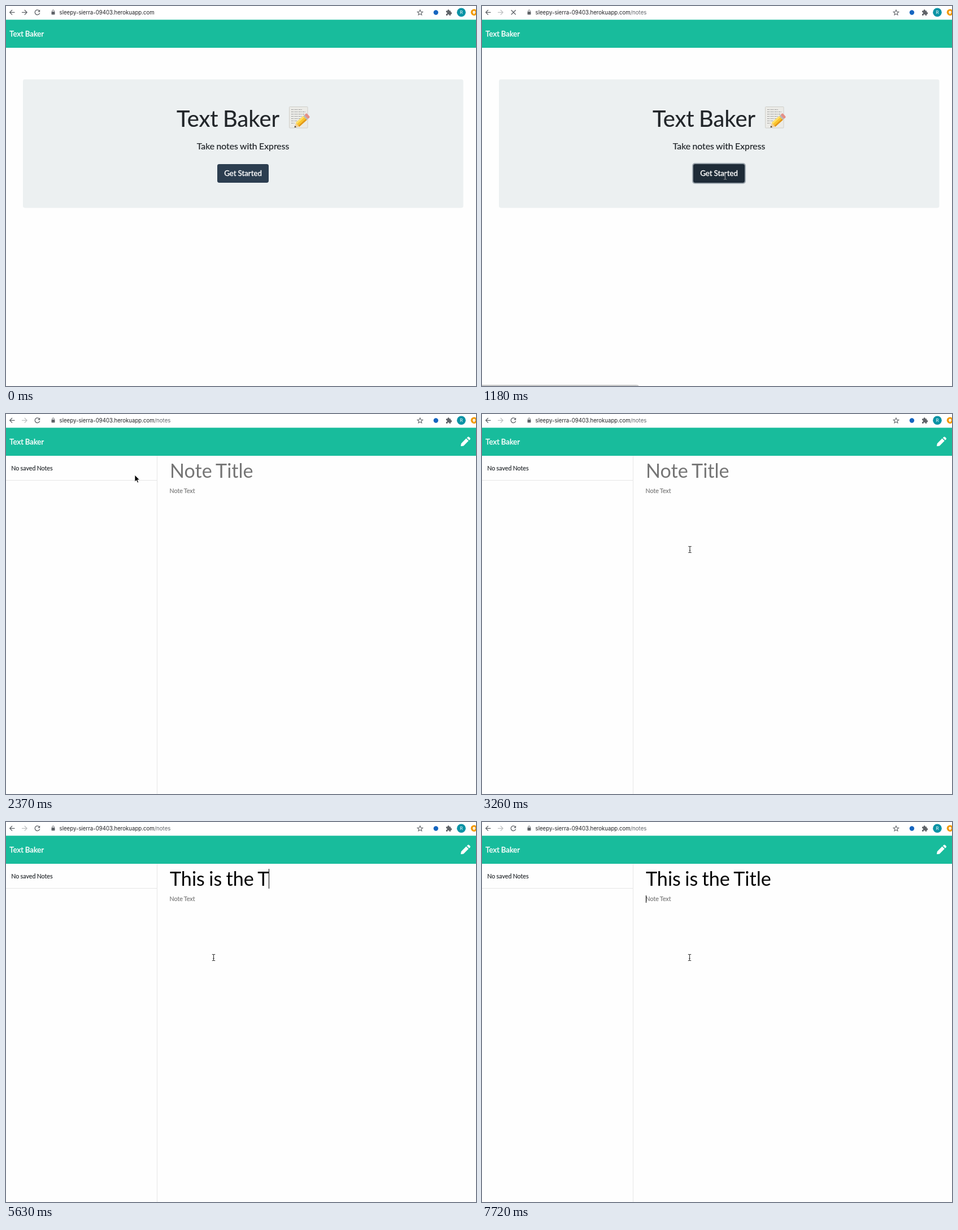
Write an HTML page that moves like this. It is 832 px wide and 673 px high and loops after 8000 ms.

```html
<!DOCTYPE html>
<html lang="en">
<head>
<meta charset="utf-8">
<title>Text Baker</title>
<style>
html, body { margin: 0; width: 100%; height: 100%; overflow: hidden; background: #fefefe; }
svg { display: block; width: 832px; height: 673px; font-family: Lato, sans-serif; }
text { white-space: pre; word-spacing: -.04em; }
.line { fill: none; stroke: #5f6368; stroke-width: 1.3; }
.small { font-size: 10.67px; stroke-width: .15; }
.lead { font-size: 13.33px; fill: #fff; stroke: #fff; stroke-width: .35; }
.ui { font-family: Inter, sans-serif; }
.dark { fill: #212529; stroke: #212529; }
</style>
</head>
<body>
<svg viewBox="0 0 832 673">
  <rect width="832" height="673" fill="#fefefe"/>

  <!-- browser bar -->
  <rect width="832" height="24.3" fill="#fff"/>
  <path class="line" d="M15.5 11.3H6.8M11 7L6.7 11.3 11 15.6"/>
  <path class="line" id="forward" d="M28 11.3H37M32.8 7L37.1 11.3 32.8 15.6"/>
  <g id="reload">
    <path class="line" d="M58.7 8.3A4.3 4.3 0 1 0 59.7 12.4"/>
    <path d="M60.2 6.5V10.6H56.1Z" fill="#5f6368"/>
  </g>
  <path class="line" id="stop" d="M51.7 7.3L59.7 15.3M59.7 7.3L51.7 15.3"/>
  <rect x="80.5" y="10" width="6" height="5.2" rx=".7" fill="#5f6368"/>
  <path class="line" style="stroke-width:1" d="M81.8 10V8.7a1.7 1.7 0 0 1 3.4 0V10"/>
  <text class="ui" x="94.6" y="14.8" font-size="9.65" fill="#202124">sleepy-sierra-09403.herokuapp.com<tspan id="path" fill="#5f6368">/notes</tspan></text>
  <path class="line" style="stroke-width:1.1" d="M733 6.9L734.3 10.1 737.7 10.4 735.1 12.6 735.9 15.9 733 14.1 730.1 15.9 730.9 12.6 728.3 10.4 731.7 10.1Z"/>
  <circle cx="761" cy="11.5" r="4.2" fill="#1565c0"/>
  <path d="M779 8.5h2.6a1.7 1.7 0 1 1 3.2 0h2.5v2.7a1.6 1.6 0 1 1 0 3.1v2.4h-2.7a1.5 1.5 0 1 0-2.9 0H779V14a1.5 1.5 0 1 0 0-2.9Z" fill="#5f6368"/>
  <circle cx="806" cy="11.3" r="7.8" fill="#0a93a5"/>
  <text class="ui" x="806" y="14.2" font-size="8" fill="#fff" text-anchor="middle">R</text>
  <circle cx="828.5" cy="11.3" r="5.7" fill="#f29900"/>
  <path d="M828.5 8l3.3 3.5h-2.1v2.8h-2.4v-2.8h-2.1Z" fill="#fff"/>

  <rect y="24.3" width="832" height="49.7" fill="#18bc9c"/>
  <text class="lead" x="6.3" y="53.7">Text Baker</text>

  <g id="home">
    <rect x="30" y="130" width="779.5" height="227.5" rx="3.4" fill="#ecf0f1"/>
    <text class="dark" x="302" y="213.8" font-size="39.82" stroke-width=".2">Text Baker</text>
    <g id="memo">
      <rect x="501.5" y="178.5" width="32.5" height="37.5" rx="1" fill="#ebebe7" stroke="#d0d0cb"/>
      <path d="M505 183.5H524M505 187.5H530M505 191.5H528M505 195.5H525M505 199.5H521M505 203.5H516M505 207.5H511" stroke="#999" stroke-dasharray="3 1 1.5 1.2" fill="none"/>
      <g transform="translate(510.5 215.3) rotate(-42)">
        <path d="M0 0L8-4.8V4.8Z" fill="#efcf9c"/>
        <path d="M0 0L3-1.8V1.8Z" fill="#333"/>
        <rect x="7.5" y="-4.8" width="18" height="9.6" fill="#fbc52d"/>
        <rect x="7.5" y="-4.8" width="18" height="3" fill="#ffe06a"/>
        <rect x="7.5" y="2.2" width="18" height="2.6" fill="#e0961c"/>
        <rect x="25.5" y="-4.8" width="3" height="9.6" fill="#b5b8ba"/>
        <rect x="28.2" y="-4.8" width="5" height="9.6" rx="2" fill="#e58f86"/>
      </g>
    </g>
    <text class="dark" x="419.6" y="254" font-size="15.8" stroke-width=".2" text-anchor="middle">Take notes with Express</text>
    <rect id="ring" x="372" y="278" width="95" height="37" rx="5" fill="#9ba5ad"/>
    <rect id="button" x="374" y="280" width="91" height="33" rx="3.4"/>
    <text class="lead" x="419.6" y="301.2" text-anchor="middle">Get Started</text>
  </g>

  <g id="notes">
    <path transform="translate(805 40)" fill="#fff" d="M10.8 2.3L12.4.7q1.2-1 2.3 0l1.9 1.9q1 1.2 0 2.3l-1.6 1.6zM9.6 3.3l4.2 4.2-8.9 8.9-4.2.7q-.6 0-.6-.6l.7-4.2z"/>
    <path d="M267.5 74V673M0 117.5H267" stroke="#e6e6e6"/>
    <text class="small dark" x="9.3" y="99.8">No saved Notes</text>
    <text id="title" x="290" y="113.4" font-size="34.13"></text>
    <text class="small" x="289.5" y="140.4" fill="#757575" stroke="#757575">Note Text</text>
    <rect id="caret" width="1"/>
  </g>

  <path id="bubble" d="M-2 674V671.5H273.5Q277 671.5 278 674Z" fill="#d8d8d8" stroke="#b4b4b4"/>

  <g id="cursor">
    <path id="arrow" d="M0 0V12L2.8 9.5 4.7 13.7 6.6 12.9 4.8 8.8H8.5Z" fill="#000" stroke="#fff" stroke-width=".8"/>
    <path id="hand" d="M-1 0Q0-1.3 1 0V4.5L5.5 5.5Q7 6 6.6 8L5.5 12.5H-1.5L-5 7.5Q-4.5 6-3 7L-1 8.5Z" fill="#fff" stroke="#222" stroke-width=".9"/>
    <path id="beam" d="M-2.7-5.5H-1L0-4.7 1-5.5H2.7M-2.7 5.5H-1L0 4.7 1 5.5H2.7M0-4.7V4.7M-1.2 1.5H1.2" fill="none" stroke="#333" stroke-width="1.1"/>
  </g>
</svg>
<script>
const $ = id => document.getElementById(id);
const show = (id, on) => $(id).style.display = on ? '' : 'none';
const set = (id, attrs) => { for (const k in attrs) $(id).setAttribute(k, attrs[k]); };
// latest [time, ...] entry that has begun
const latest = (list, t) => list.filter(e => e[0] <= t).pop();

const HEADLINE = 'This is the Title';
const typing = [[0, 0], [4010, 1], [4160, 2], [4300, 5], [4450, 6], [4600, 7],
  [4740, 8], [4890, 10], [5030, 12], [5630, 13], [5920, 15], [6220, 16], [6370, 17]];
const moves = [[0, 0, 0, ''], [150, 822, 420, 'arrow'], [300, 690, 375, 'arrow'],
  [450, 550, 335, 'arrow'], [600, 460, 306, 'hand'], [730, 431, 298, 'hand'],
  [1180, 430.5, 301.5, 'beam'], [1630, 410, 262, 'beam'], [1780, 365, 205, 'beam'],
  [1930, 315, 160, 'beam'], [2070, 285, 136, 'beam'], [2370, 228, 108, 'arrow'],
  [2520, 298, 102, 'beam'], [2670, 318, 145, 'beam'], [2820, 350, 212, 'beam'],
  [2970, 368, 240, 'beam'], [3710, 367.5, 240, 'beam']];
const within = (t, a, b) => t >= a && t < b;

function draw(t) {
  const clicked = t >= 880, loaded = t >= 1330, hover = t >= 600;
  show('home', !loaded);
  show('notes', loaded);
  show('path', clicked);
  show('stop', clicked && !loaded);
  show('reload', !clicked || loaded);
  show('ring', clicked);
  $('forward').style.stroke = clicked ? '#bfc1c3' : '#5f6368';
  set('button', { fill: hover ? '#1e2b37' : '#2c3e50' });

  const fade = latest([[0, 1], [1630, .75], [1780, .5], [1930, .25], [2070, 0]], t)[1];
  set('bubble', { opacity: hover ? fade : 0 });

  const [, x, y, kind] = latest(moves, t);
  for (const id of ['arrow', 'hand', 'beam']) show(id, id === kind);
  set('cursor', { transform: `translate(${x} ${y})` });
  set('beam', { stroke: loaded ? '#333' : '#8a8f94' });

  const count = latest(typing, t)[1], title = $('title');
  title.textContent = count ? HEADLINE.slice(0, count) : 'Note Title';
  set('title', { fill: count ? '#000' : '#757575' });

  const inBody = t >= 6670;
  const caretOn = within(t, 2520, 3260) || within(t, 3710, 7270) || t >= 7720;
  show('caret', caretOn);
  if (caretOn) {
    const end = count && !inBody ? title.getComputedTextLength() : 0;
    set('caret', { x: Math.round(290 + end), y: inBody ? 130 : 83, height: inBody ? 13 : 35 });
  }
}

function tick() {
  draw(performance.now() % 8000);
  requestAnimationFrame(tick);
}
tick();
</script>
</body>
</html>
```
